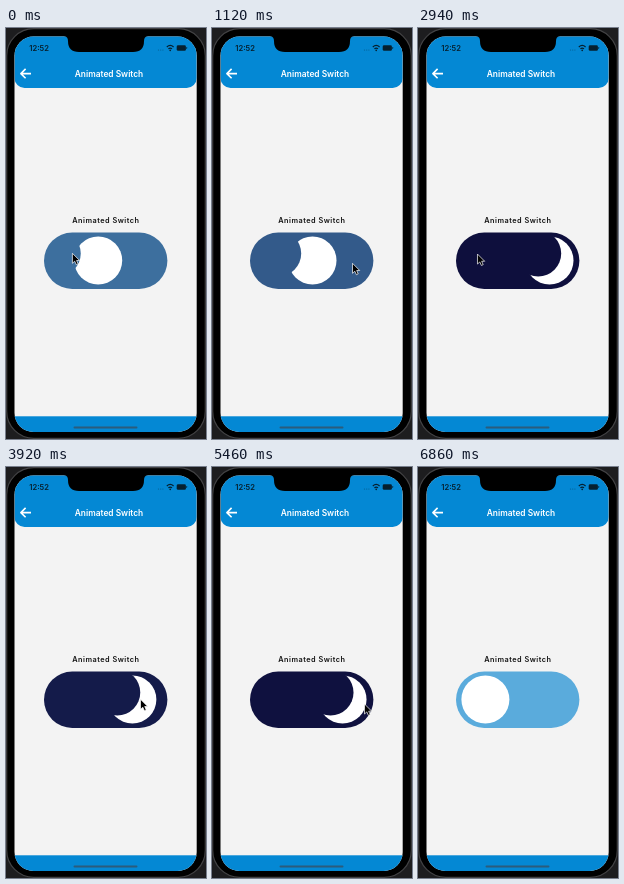
Recreate the animation shown at these times as an HTML page. Size 200x411 px, loop 7.42 s.

```html
<!DOCTYPE html>
<html lang="en">
<head>
<meta charset="utf-8">
<title>Animated Switch</title>
<style>
  html, body { margin: 0; width: 100%; height: 100%; overflow: hidden; background: #1d1d1f; }
  svg { display: block; width: 100%; height: 100%; }
  text { font-family: Inter, Roboto, sans-serif; font-weight: 600; }
</style>
</head>
<body>
<svg viewBox="0 0 200 411">
  <defs>
    <clipPath id="screen"><rect x="8.5" y="8.6" width="182.2" height="395.4" rx="19"/></clipPath>
    <mask id="moon" maskUnits="userSpaceOnUse" x="0" y="190" width="200" height="90">
      <rect y="190" width="200" height="90" fill="#fff"/>
      <circle id="shade" cy="225.5" r="23"/>
    </mask>
  </defs>

  <rect x=".7" y=".7" width="198.6" height="409.6" rx="27" fill="#000" stroke="#424244" stroke-width="1.2"/>

  <g clip-path="url(#screen)">
    <rect x="8" y="8" width="183" height="397" fill="#f3f3f3"/>
    <rect x="8.5" y="-10" width="182.2" height="69.9" rx="10" fill="#0488d4"/>
    <rect x="8" y="388.3" width="183" height="16" fill="#0488d4"/>
  </g>
  <path d="M58 8Q62 8.6 62 13Q62 24 73 24H127Q138 24 138 13Q138 8.6 142 8Z" fill="#000"/>
  <rect x="67.5" y="398.4" width="64" height="2" rx="1" fill="#2b5c7c"/>

  <text x="23.2" y="23.2" font-size="7.6" fill="#06202f">12:52</text>
  <g fill="#06202f">
    <g opacity=".4">
      <circle cx="152.5" cy="22" r=".6"/><circle cx="154.7" cy="22" r=".6"/><circle cx="156.9" cy="22" r=".6"/>
    </g>
    <path d="M160.8 19Q164.2 15.8 167.6 19M162.4 20.9Q164.2 19.3 166 20.9" fill="none" stroke="#06202f" stroke-width="1.2"/>
    <circle cx="164.2" cy="22.4" r=".8"/>
    <rect x="170.7" y="17.3" width="9.2" height="5.5" rx="1.4"/>
    <rect x="180.3" y="19" width=".8" height="2" rx=".4"/>
  </g>

  <path d="M25 45.6H15M19.6 40.9L14.9 45.6L19.6 50.3" fill="none" stroke="#fff" stroke-width="1.6" stroke-linejoin="round"/>
  <text x="103" y="48.6" font-size="8.4" fill="#fff" text-anchor="middle">Animated Switch</text>
  <text x="66.3" y="195.4" font-size="7.3" letter-spacing=".5" fill="#111">Animated Switch</text>

  <rect id="track" x="38" y="204.5" width="123.4" height="56.4" rx="28.2"/>
  <g mask="url(#moon)"><circle id="knob" cy="232.5" r="24" fill="#fff"/></g>
  <path id="cursor" d="M0 0V10L2.3 7.9L3.9 11.4L5.7 10.6L4.2 7.2H7.2Z" fill="#000" stroke="#fff" stroke-width=".7" stroke-linejoin="round"/>
</svg>
<script>
  const LOOP = 7420, TICK = 140, SLIDE = 600;
  const DAY = [90, 171, 220], NIGHT = [14, 15, 61];

  // Moments of the taps; the switch is off before the first one.
  const taps = [-264, 825, 2328, 3800, 4912, 5750];

  // Pointer stops: time, x, y
  const stops = [
    [0, 66.4, 225.3], [560, 66.4, 225.3], [840, 140.5, 235.3], [1400, 140.5, 235.3],
    [1960, 60, 227], [2100, 60, 227], [2240, 58.8, 226], [2900, 58.8, 226],
    [3500, 134.5, 232.3], [4060, 134.5, 232.3], [4620, 71.5, 230.3], [4920, 71.5, 230.3],
    [5460, 152.5, 237], [5960, 152.5, 237], [6580, 210, 262], [LOOP, 210, 262]
  ];

  const [track, knob, shade, cursor] =
    ["track", "knob", "shade", "cursor"].map(id => document.getElementById(id));
  const mix = (a, b, k) => a + (b - a) * k;
  const ease = u => u < .5 ? 2 * u * u : 1 - 2 * (1 - u) ** 2;

  function switchAt(time) {
    const last = taps.filter(tap => tap <= time).length - 1;
    const moved = ease(Math.min(1, (time - taps[last]) / SLIDE));
    return last % 2 ? 1 - moved : moved;
  }

  function pointerAt(time) {
    const next = stops.findIndex(stop => stop[0] > time);
    const [t0, x0, y0] = stops[next - 1], [t1, x1, y1] = stops[next];
    const k = ease((time - t0) / (t1 - t0));
    return [mix(x0, x1, k), mix(y0, y1, k)];
  }

  function draw(time) {
    const p = switchAt(time);
    const color = DAY.map((c, i) => Math.round(mix(c, NIGHT[i], p)));
    track.setAttribute("fill", `rgb(${color})`);
    knob.setAttribute("cx", mix(67.4, 131.5, p));
    shade.setAttribute("cx", mix(8.5, 120.2, p));
    cursor.setAttribute("transform", `translate(${pointerAt(time)})`);
  }

  const start = performance.now();
  function frame() {
    const time = (performance.now() - start) % LOOP;
    draw(Math.floor(time / TICK) * TICK);
    requestAnimationFrame(frame);
  }
  frame();
</script>
</body>
</html>
```
